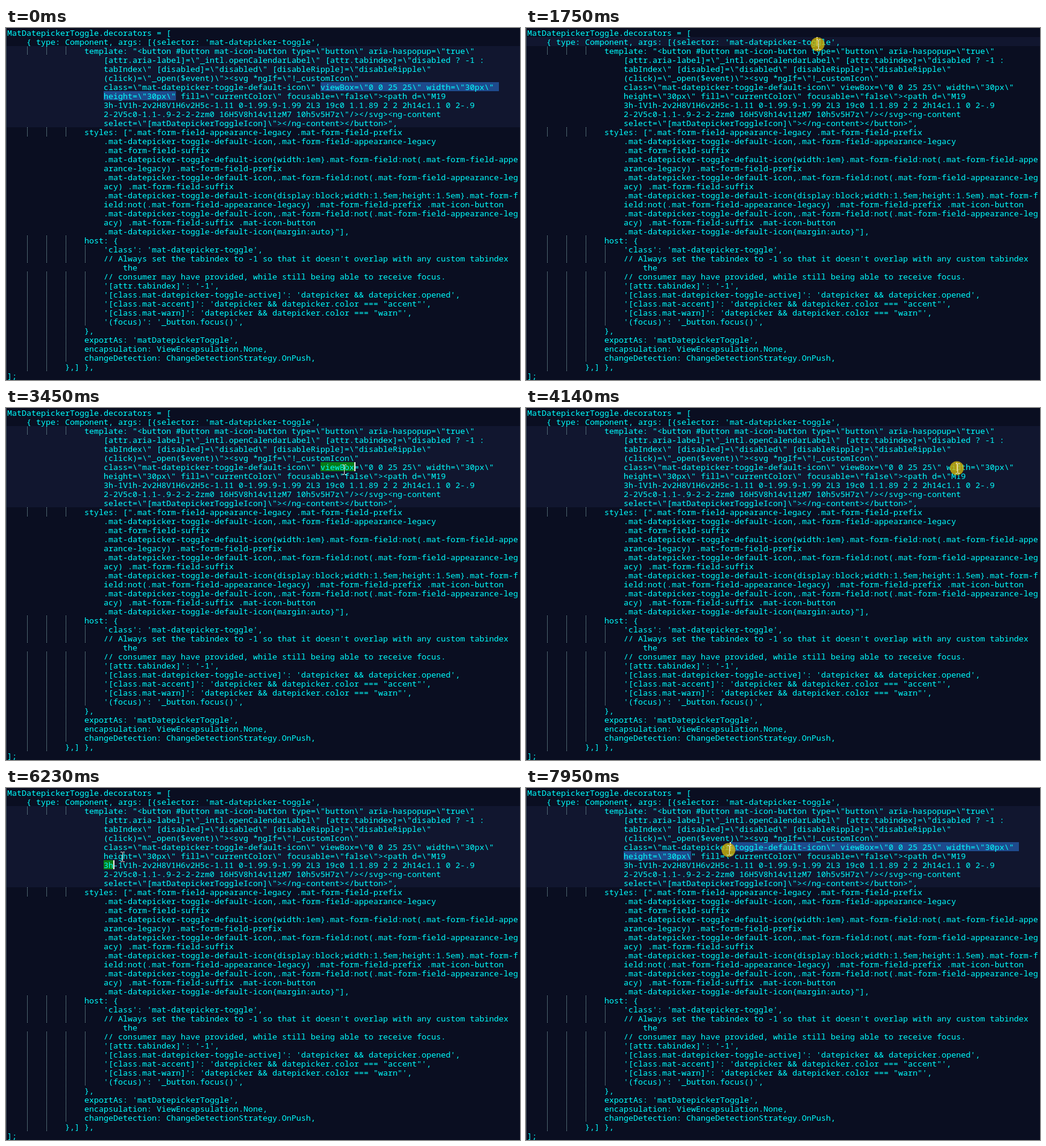
Animation of 853x585 px, one loop 8 s. Source, as an HTML page with a canvas:

```html
<!DOCTYPE html>
<html lang="en">
<head>
<meta charset="utf-8">
<title>Code editor</title>
<style>
html, body { margin: 0; width: 100%; height: 100%; overflow: hidden; background: #0a0e21; }
canvas { display: block; }
</style>
</head>
<body>
<canvas width="853" height="585"></canvas>
<script>
const ctx = document.querySelector('canvas').getContext('2d');
const LOOP = 8000, STEP = 77, CELL = 8, ROW = 15, LEFT = 2;
const PRESS = 80, SECOND_PRESS = 150;

// A leading bar marks the continuation of a wrapped line
const source = String.raw`MatDatepickerToggle.decorators = [
    { type: Component, args: [{selector: 'mat-datepicker-toggle',
                template: "<button #button mat-icon-button type=\"button\" aria-haspopup=\"true\"
|                   [attr.aria-label]=\"_intl.openCalendarLabel\" [attr.tabindex]=\"disabled ? -1 :
|                   tabIndex\" [disabled]=\"disabled\" [disableRipple]=\"disableRipple\"
|                   (click)=\"_open($event)\"><svg *ngIf=\"!_customIcon\"
|                   class=\"mat-datepicker-toggle-default-icon\" viewBox=\"0 0 25 25\" width=\"30px\"
|                   height=\"30px\" fill=\"currentColor\" focusable=\"false\"><path d=\"M19
|                   3h-1V1h-2v2H8V1H6v2H5c-1.11 0-1.99.9-1.99 2L3 19c0 1.1.89 2 2 2h14c1.1 0 2-.9
|                   2-2V5c0-1.1-.9-2-2-2zm0 16H5V8h14v11zM7 10h5v5H7z\"/></svg><ng-content
|                   select=\"[matDatepickerToggleIcon]\"></ng-content></button>",
                styles: [".mat-form-field-appearance-legacy .mat-form-field-prefix
|                   .mat-datepicker-toggle-default-icon,.mat-form-field-appearance-legacy
|                   .mat-form-field-suffix
|                   .mat-datepicker-toggle-default-icon{width:1em}.mat-form-field:not(.mat-form-field-appe
|                   arance-legacy) .mat-form-field-prefix
|                   .mat-datepicker-toggle-default-icon,.mat-form-field:not(.mat-form-field-appearance-leg
|                   acy) .mat-form-field-suffix
|                   .mat-datepicker-toggle-default-icon{display:block;width:1.5em;height:1.5em}.mat-form-f
|                   ield:not(.mat-form-field-appearance-legacy) .mat-form-field-prefix .mat-icon-button
|                   .mat-datepicker-toggle-default-icon,.mat-form-field:not(.mat-form-field-appearance-leg
|                   acy) .mat-form-field-suffix .mat-icon-button
|                   .mat-datepicker-toggle-default-icon{margin:auto}"],
                host: {
                    'class': 'mat-datepicker-toggle',
                    // Always set the tabindex to -1 so that it doesn't overlap with any custom tabindex
|                       the
                    // consumer may have provided, while still being able to receive focus.
                    '[attr.tabindex]': '-1',
                    '[class.mat-datepicker-toggle-active]': 'datepicker && datepicker.opened',
                    '[class.mat-accent]': 'datepicker && datepicker.color === "accent"',
                    '[class.mat-warn]': 'datepicker && datepicker.color === "warn"',
                    '(focus)': '_button.focus()',
                },
                exportAs: 'matDatepickerToggle',
                encapsulation: ViewEncapsulation.None,
                changeDetection: ChangeDetectionStrategy.OnPush,
            },] },
];`.split('\n');
const lines = source.map(line => line.replace('|', ' '));
const isWrapped = row => source[row]?.[0] === '|';
const indentOf = line => line.search(/\S/);

// The pointer travels to each stop; a click there is a double-click unless it starts the drag
const stops = [
  { from: 210, to: 520, x: 645, y: 211 },
  { from: 750, to: 1670, x: 485, y: 27, click: 1750 },
  { from: 2130, to: 2820, x: 554, y: 102, click: 2990 },
  { from: 3450, to: 3990, x: 716, y: 100, click: 4140 },
  { from: 4610, to: 5300, x: 175, y: 122, click: 5530 },
  { from: 6070, to: 6300, x: 196, y: 112, click: 6470 },
  { from: 6940, to: 7320, x: 276, y: 113, click: 7640, drag: true },
  { from: 7870, to: 7950, x: 337, y: 103 }
];

function pointerAt(t) {
  let x = 738, y = 508;
  for (const stop of stops) {
    if (t < stop.from) break;
    const elapsed = (Math.floor((t - stop.from) / STEP) + 1) * STEP;
    const p = Math.min(1, elapsed / (stop.to - stop.from + STEP));
    const eased = p * p * (3 - 2 * p);
    x += (stop.x - x) * eased;
    y += (stop.y - y) * eased;
  }
  return { x: Math.round(x), y: Math.round(y) };
}

const cellAt = ({ x, y }) => ({ row: Math.floor(y / ROW), col: Math.round((x - LEFT) / CELL) });

function wordAt({ row, col }) {
  return [...lines[row].matchAll(/\w+/g)].find(m => m.index <= col && col <= m.index + m[0].length);
}

// Everything the editor shows follows from the latest click
function editorAt(t) {
  const stop = stops.filter(s => s.click <= t).pop();
  if (!stop) return { caret: { row: 6, col: 65 }, selectionEnd: { row: 7, col: 35 }, hideCaret: true };
  const age = t - stop.click, cell = cellAt(stop);
  if (stop.drag) return { caret: cellAt(pointerAt(t)), selectionEnd: cell, pressed: true };
  if (age < SECOND_PRESS) return { caret: cell, pressed: age < PRESS };
  const word = wordAt(cell);
  return {
    caret: { row: cell.row, col: word.index + word[0].length },
    mark: word[0],
    pressed: age < SECOND_PRESS + PRESS,
    hideCaret: age % 1300 > 800
  };
}

function box(color, x, y, w, h) {
  ctx.fillStyle = color;
  ctx.fillRect(x, y, w, h);
}

function cells(color, row, from, to) {
  box(color, LEFT + from * CELL, row * ROW, (to - from) * CELL, ROW);
}

function drawParagraph(row) {
  let first = row, last = row;
  while (isWrapped(first)) first--;
  while (isWrapped(last + 1)) last++;
  box('#11162f', 0, first * ROW, 853, (last - first + 1) * ROW);
}

function drawGuides() {
  box('#48545f', 0, 0, 1, 585);
  lines.forEach((line, row) => {
    if (isWrapped(row)) return;
    for (let col = 4; col < indentOf(line); col += 4)
      for (let y = row * ROW; y < (row + 1) * ROW; y++)
        if (y % 2) box('#8ab4b6', LEFT + 1 + col * CELL, y, 1, 1);
  });
}

function drawSelection(start, end) {
  for (let row = start.row; row <= end.row; row++)
    cells('#1e4a8c', row,
      row === start.row ? start.col : indentOf(lines[row]),
      row === end.row ? end.col : lines[row].length + 1);
}

function drawMarks(word) {
  lines.forEach((line, row) => {
    for (const hit of line.matchAll(new RegExp(`\\b${word}\\b`, 'g')))
      cells('#087c18', row, hit.index, hit.index + word.length);
  });
}

function drawText() {
  ctx.font = '13.3333px "Noto Sans Mono", monospace';
  ctx.fillStyle = '#00ffff';
  lines.forEach((line, row) => {
    const indent = indentOf(line);
    ctx.fillText(line.slice(indent), LEFT + indent * CELL, row * ROW + 13);
  });
}

function drawPointer({ x, y }, pressed) {
  if (pressed) {
    ctx.fillStyle = 'rgba(212, 184, 12, .78)';
    ctx.beginPath();
    ctx.arc(x - 1, y, 11.5, 0, 7);
    ctx.fill();
  }
  const ink = '#e4e4dc';
  box(ink, x, y - 7, 1, 15);
  for (const dy of [-8, 8])
    for (const dx of [-3, 1]) box(ink, x + dx, y + dy, 3, 1);
}

function draw(t) {
  const { caret, selectionEnd, mark, pressed, hideCaret } = editorAt(t);
  box('#0a0e21', 0, 0, 853, 585);
  drawParagraph(caret.row);
  drawGuides();
  if (selectionEnd) drawSelection(caret, selectionEnd);
  if (mark) drawMarks(mark);
  drawText();
  if (!hideCaret) box('#f0f0f0', LEFT + caret.col * CELL, caret.row * ROW, 2, ROW);
  if (t >= stops[0].from) drawPointer(pointerAt(t), pressed);
}

function tick() {
  draw(performance.now() % LOOP);
  requestAnimationFrame(tick);
}
tick();
</script>
</body>
</html>
```
